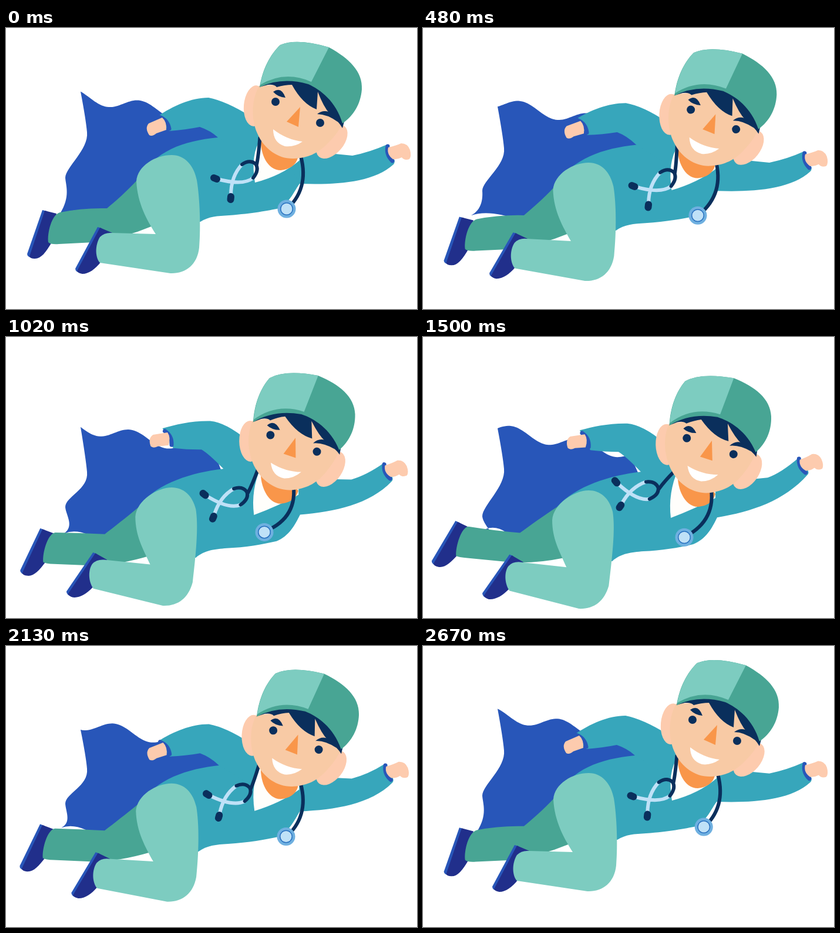
An HTML page with a canvas that plays this animation: 700x480 px, repeating every 2700 ms.

```html
<!DOCTYPE html>
<html lang="en">
<head>
<meta charset="utf-8">
<title>Flying doctor</title>
<style>
html, body { margin: 0; width: 700px; height: 480px; overflow: hidden; background: #fff; }
canvas { display: block; }
</style>
</head>
<body>
<canvas id="stage" width="700" height="480"></canvas>
<script>
const ctx = document.getElementById('stage').getContext('2d');
const LOOP = 2700, TAU = Math.PI * 2;
const TIMES = [0, 480, 1020, 1500, 1740, 2130];
const TEAL = '#37a6bb', BLUE = '#2856b9', SHOE = '#212f8b', GREEN = '#48a594', MINT = '#7dccc0',
      NAVY = '#0a2f5c', SKIN = '#f8caa5', PINK = '#fdcbae', ORANGE = '#f9964a', ICE = '#bfe1f7';

let now = 0;

// Smooth looping curve through one value per entry of TIMES
function key(...values) {
  const n = TIMES.length;
  const time = i => TIMES[(i + n) % n] + LOOP * Math.floor(i / n);
  const value = i => values[(i + n) % n];
  const slope = i => (value(i + 1) - value(i - 1)) / (time(i + 1) - time(i - 1));
  let i = n - 1;
  while (TIMES[i] > now) i--;
  const span = time(i + 1) - time(i), s = (now - time(i)) / span, r = 1 - s;
  return r * r * ((1 + 2 * s) * value(i) + s * span * slope(i)) +
         s * s * ((1 + 2 * r) * value(i + 1) - r * span * slope(i + 1));
}

// Blend two paths that share the same commands
function mix(a, b, k) {
  const ends = b.match(/-?[\d.]+/g);
  let i = 0;
  return a.replace(/-?[\d.]+/g, v => (+v + (ends[i++] - v) * k).toFixed(2));
}

function fill(color, path) {
  ctx.fillStyle = color;
  ctx.fill(new Path2D(path));
}

function line(color, width, path) {
  ctx.strokeStyle = color;
  ctx.lineWidth = width;
  ctx.stroke(new Path2D(path));
}

function oval(color, x, y, rx, ry = rx, degrees = 0) {
  ctx.fillStyle = color;
  ctx.beginPath();
  ctx.ellipse(x, y, rx, ry, degrees * TAU / 360, 0, TAU);
  ctx.fill();
}

// Draw a rigid part moved by dx, dy and turned about a pivot
function part(px, py, dx, dy, degrees, draw) {
  ctx.save();
  ctx.translate(px + dx, py + dy);
  ctx.rotate(degrees * TAU / 360);
  ctx.translate(-px, -py);
  draw();
  ctx.restore();
}

function cape() {
  const top = x => 123 + 0.18 * (x - 165) + 10.5 * Math.cos(TAU * ((x - 171) / 116 + now / 900));
  const sideY = key(178, 193, 193, 183, 180, 193);
  const bumpY = key(256, 266, 253, 264, 261, 253);
  const tailX = key(92, 82, 99, 106, 106, 94);
  const tailY = key(317, 308, 298, 286, 285, 294);
  let edge = '';
  for (let x = 127; x <= 352; x += 3) edge += `L${x} ${top(x)}`;
  fill(BLUE, `M127 ${top(127)}${edge}L366 189L240 280L165 316
    Q${tailX + 30} ${tailY - 11} ${tailX} ${tailY}
    C${tailX + 18} ${bumpY + 32} 102 ${bumpY + 14} 101 ${bumpY}
    C101 ${bumpY - 18} 141 ${sideY + 30} 138 ${sideY}
    Q136 ${sideY - 22} 127 ${top(127)}Z`);
}

function rearLeg() {
  const k = key(0, 0.02, 0.54, 0.98, 1, 0.58);
  part(62, 312, -7 * k, -40 * k, 11.7 * k, () => {
    fill(BLUE, 'M62 311L70 313L48 393Q36 392 36 386Z');
    fill(SHOE, 'M66 312L86 317L78 366C68 383 60 394 49 394Q41 394 40 390Z');
  });
  fill(GREEN, mix(
    'M225 258C205 280 185 297 172 308Q130 307 92 315C78 318 70 350 72 366Q76 370 90 369L150 366Q200 359 250 338L262 300Z',
    'M228 248C205 263 180 281 165 292Q125 289 77 281C65 282 55 315 56 331Q60 333 75 334.5L150 342Q190 345 240 335L262 300Z', k));
}

function frontLeg(k) {
  part(156, 340, -9 * k, -11 * k, 7 * k, () => {
    fill(BLUE, 'M156 340L163 342L128 419Q118 417 118 411Z');
    fill(SHOE, 'M160 341L181 350L162 399C152 412 141 420 130 420Q123 419 121 415Z');
  });
  fill(MINT, mix(
    'M222 262C224 235 255 217 282 217C305 217 320 235 325 260C330 290 332 340 329 375C326 405 305 420 280 419L160 401C152 392 151 372 160 357Q168 349 180 350L255 352C240 328 224 300 222 262Z',
    'M220 271C222 243 258 220 282 220C302 220 317 233 323 256C327 282 324 318 316 383C308 410 290 423 265 422L147 391C138 378 138 358 145 349Q152 341 165 342L244 351C232 323 220 303 220 271Z', k));
}

function torso(k) {
  fill(TEAL, mix(
    'M361 187C300 193 255 210 225 258L300 331L331 331C345 322 360 321 380 320C420 317 445 312 466 308C485 295 490 280 500 266L540 215L480 150L410 150Z',
    'M371 188C320 194 260 212 228 248L300 340L322 341C338 327 355 326 375 324C405 323 435 318 460 312C482 303 492 285 501 266L540 215L480 150L405 150Z', k));
}

function leftArm() {
  const k = key(0, 0.22, 0.95, 1, 0.74, 0.15);
  fill(TEAL, mix(
    'M415 150Q375 125 345 119C315 119 285 133 258 151L278 176Q305 174 330 169Q348 175 361 187L430 230Z',
    'M410 138Q375 108 348 105.5C315 105 290 111 267 117L285 151Q310 154 333 154Q345 161 371 188L430 230Z', k));
  part(256, 168, 6 * k, -32 * k, 15 * k, () => {
    line(BLUE, 7, 'M261 152Q275 157 278 172');
    fill(PINK, 'M243 163L266 153Q274 160 273 174L256 180Q249 186 244 183Q236 171 243 163Z');
  });
}

function rightArm() {
  const k = key(0, 0.01, 0.6, 1, 0.9, 0.4);
  fill(TEAL, mix(
    'M480 230L500 266C560 268 625 265 660 233Q663 230 661 224L649 199Q620 212 590 218L550 214L500 180Z',
    'M480 230L501 266C560 256 615 238 655 193Q658 190 655 184L641 163Q610 190 587 198L567 200L500 180Z', k));
  part(655, 215, -8 * k, -37 * k, -7.6 * k, () => {
    line(BLUE, 7, 'M650 202Q647 216 658 227');
    fill(PINK, 'M651 204Q664 201 673 197Q684 197 688 208Q691 219 687 224Q679 227 674 221Q667 225 659 224Q648 216 651 204Z');
  });
}

function collar(k) {
  fill('#fffefb', mix('M434 190Q416 215 424 264Q470 252 500 226L500 205Z',
                      'M434 185Q417 225 422 267Q465 250 498 233L498 205Z', k));
  fill(ORANGE, mix('M434 190C433 215 445 243 468 243C482 242 494 234 497 222L480 200Z',
                   'M434 195C433 215 445 248 468 248C482 247 494 241 498 226L480 200Z', k));
}

function stethoscope() {
  const jx = key(427, 429, 412, 402, 405, 417), jy = key(233, 235, 229, 217, 222, 227);
  line(NAVY, 6, `M${jx / 5 + 347} 188Q${jx * 0.7 + 131} ${jy - 14} ${jx} ${jy}`);
  part(427, 233, jx - 427, jy - 233, key(0, 1, 17, 28, 28, 11), () => {
    line(ICE, 6, 'M402 233Q383 253 383 286M421 256Q404 270 360 258');
    line(NAVY, 6, 'M402 233Q415 224 425 232Q432 242 421 256');
    line(NAVY, 12, 'M354 256L359 258M383 288L382.5 293');
  });
  const x = key(478, 468, 440, 445, 458, 477), y = key(309, 308, 296, 300, 305, 309);
  const neckX = key(500, 498, 489, 490, 495, 500);
  line(NAVY, 6, `M${neckX} 212Q${neckX + x / 4 - 101} 270 ${x + 3} ${y - 2}`);
  oval('#6fb0e0', x, y, 15.5);
  oval('#2a72c0', x, y, 11);
  oval(ICE, x, y, 9.5);
}

function head(k) {
  part(497, 144, -8.2 * k, 0.3 * k, -6.6 * k, () => {
    oval(PINK, 424, 133, 19, 35, 5);
    oval(PINK, 555, 194, 34, 20, -50);
    fill(SKIN, 'M432 98C418 120 417 155 428 180C440 208 465 224 490 223C515 222 530 214 545 200C560 185 568 175 574 160L540 95Z');
    fill(NAVY, 'M431 101Q455 84 490 88Q560 100 576 160L573 171Q567 160 551 146Q541 135 531 109L529 139Q505 130 487 97Q475 97 461 101Q457 96 446 97Z');
    fill(NAVY, 'M455 109Q469 99 476 119Q463 118 455 109ZM530 147Q543 137 556 147L566 161Q547 147 530 147Z');
    oval(NAVY, 459, 126, 7);
    oval(NAVY, 535, 162, 7);
    fill(ORANGE, 'M501 135L478 160L498 169Z');
    fill('#fff', 'M455 173Q478 191 505 194Q491 204 475 202Q455 196 455 173Z');
    fill(GREEN, 'M432 101C437 70 450 45 467 29Q495 17 550 33C585 52 608 75 606 105C604 130 592 150 573 163C562 125 535 105 515 96Q470 83 432 101Z');
    fill(MINT, 'M433 97C438 70 450 45 467 29Q495 17 550 33L520 92Q475 72 433 97Z');
  });
}

function draw(clock) {
  now = Math.floor(clock % LOOP / 30) * 30;
  const sink = (1 - Math.cos(TAU * now / LOOP)) / 2;
  ctx.fillStyle = '#fff';
  ctx.fillRect(0, 0, 700, 480);
  ctx.lineCap = 'round';
  ctx.save();
  ctx.translate(0, 43.5 * sink);
  cape();
  rearLeg();
  torso(sink);
  leftArm();
  rightArm();
  frontLeg(sink);
  collar(sink);
  stethoscope();
  head(sink);
  ctx.restore();
}

const start = performance.now();
function tick() {
  draw(performance.now() - start);
  requestAnimationFrame(tick);
}
tick();
</script>
</body>
</html>
```
